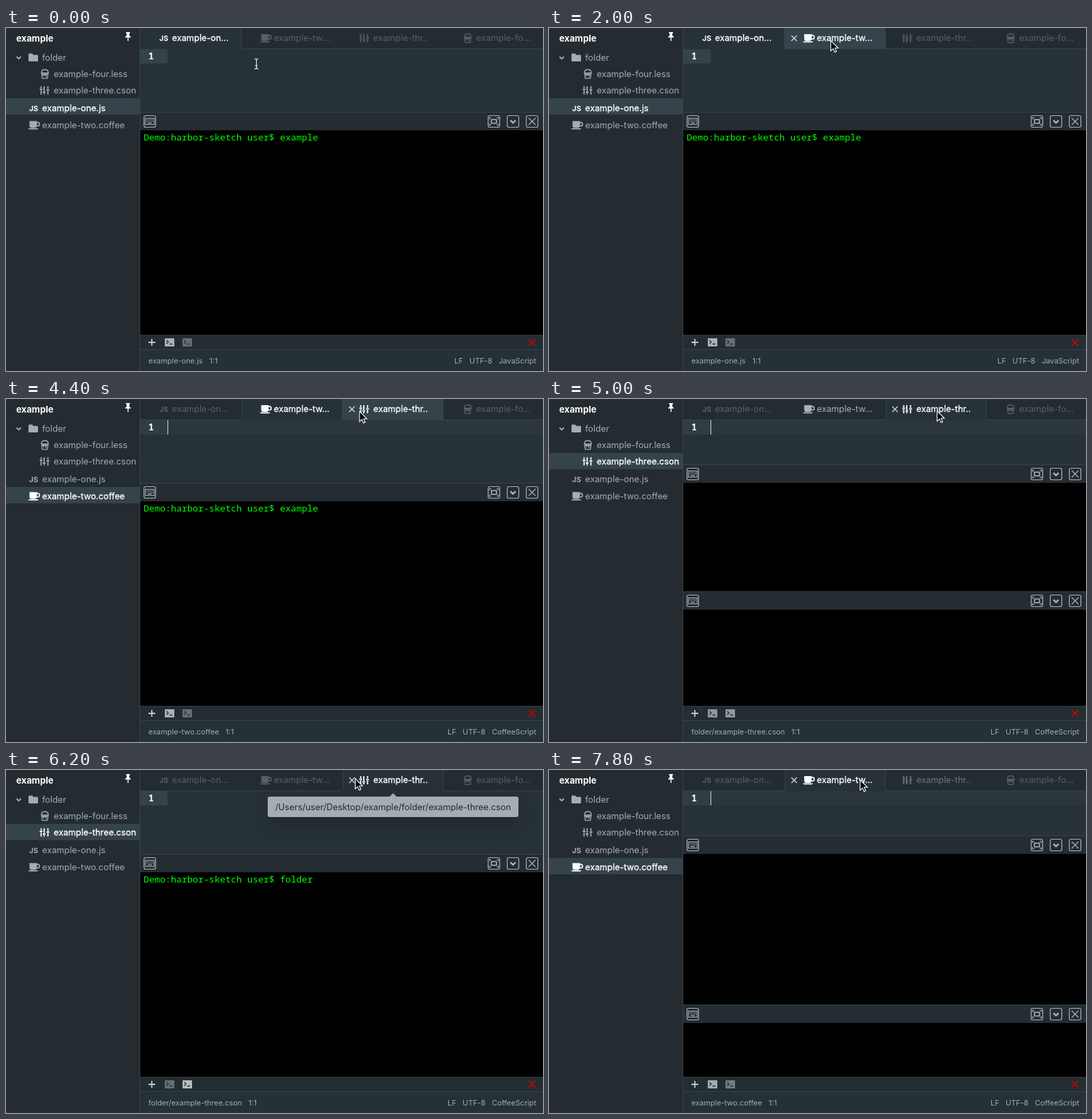
An HTML page that plays this animation: 788 by 503 pixels, repeating every 8 s.

```html
<!DOCTYPE html>
<html lang="en">
<head>
<meta charset="utf-8">
<title>Editor with terminals</title>
<style>
  html, body { margin: 0; width: 100%; height: 100%; overflow: hidden; background: #242c31; }
  svg { display: block; width: 788px; height: 503px; font: 12.8px Inter, sans-serif; }
  text { white-space: pre; }
  .strong { stroke: #fff; stroke-width: .3px; }
  .small { font-size: 10.95px; }
  .mono { font: 500 13.33px "Noto Sans Mono", monospace; }
  .bold { font-weight: 700; }
  .tip { filter: drop-shadow(0 10px 12px rgba(0, 0, 0, .22)); }
</style>
</head>
<body>
<svg id="stage" viewBox="0 0 788 503"></svg>
<script>
const LOOP = 8000, STEP = 200;
const C = { side: '#242c31', bar: '#232c31', edit: '#273238', line: '#35434a', hot: '#35434a',
            text: '#a4adb1', dim: '#566065', icon: '#a9b2b6' };

// row: top of the highlight, base: text baseline in the tree
const FILES = {
  one:   { name: 'example-one.js', lang: 'JavaScript', icon: 'js', short: 'example-on...', row: 103, base: 122 },
  two:   { name: 'example-two.coffee', lang: 'CoffeeScript', icon: 'cup', short: 'example-tw...', row: 129, base: 147 },
  three: { name: 'example-three.cson', dir: 'folder/', lang: 'CoffeeScript', icon: 'sliders', short: 'example-thr..', row: 79, base: 96 },
  four:  { name: 'example-four.less', icon: 'bucket', short: 'example-fo...', base: 72 }
};
const TABS = [
  { id: 'one', x: 197, end: 346, icon: 231, text: 243.5 },
  { id: 'two', x: 346, end: 494, icon: 380.5, text: 393 },
  { id: 'three', x: 494, end: 642, icon: 526, text: 539 },
  { id: 'four', x: 642, end: 788, icon: 677.5, text: 690 }
];

// Pointer path: time, x, y
const PATH = [[0, 367, 52], [1200, 367, 52], [1600, 404, 26], [2000, 413, 18], [2600, 417, 19], [4000, 417, 19],
              [4600, 569, 17], [5800, 569, 17], [6200, 512, 12], [7000, 456, 14], [8000, 456, 14]];

const rect = (x, y, w, h, fill, extra = '') => `<rect x="${x}" y="${y}" width="${w}" height="${h}" fill="${fill}" ${extra}/>`;
const label = (x, y, s, fill, extra = '') => `<text x="${x}" y="${y}" fill="${fill}" ${extra}>${s}</text>`;
const stroke = (d, color, w = 1.3) => `<path d="${d}" fill="none" stroke="${color}" stroke-width="${w}"/>`;
const fill = (d, color) => `<path d="${d}" fill="${color}"/>`;
const at = (x, y, s) => `<g transform="translate(${x} ${y})">${s}</g>`;
const cross = (r, color, w) => stroke(`M${-r} ${-r}L${r} ${r}M${r} ${-r}L${-r} ${r}`, color, w);

// Icons are centred on 0,0
const ICONS = {
  js: c => label(-6, 4, 'JS', c, 'font-size="10.5" font-weight="700"'),
  cup: c => fill('M-6 -6H5V-5H6A3.2 3.2 0 0 1 6 2H4.5Q4 4 2 4H-3Q-6 4 -6 1ZM5 -3.3V.5H6A1.9 1.9 0 0 0 6 -3.3ZM-8 4.6H7Q6.5 6.2 5 6.2H-6Q-7.5 6.2 -8 4.6Z', c),
  sliders: c => stroke('M-5.5 -6V-3M-5.5 0V6M-1 -6V1M-1 4V6M4.5 -6V-2M4.5 1V6', c, 1.8) +
    stroke('M-7.5 -1.5H-3.5M-3 2.5H1M2.5 -.5H6.5', c, 2),
  bucket: c => stroke('M-5 -2Q-5 -6.5 0 -6.5T5 -2M-5.8 -1.7H5.8M-4.8 -1L-3.8 6.3H3.8L4.8 -1', c, 1.3) +
    fill('M-4.5 -1H4.5V1H2.5V4H.8V1.5H-1V3H-2.8V1H-4.5Z', c)
};

function pointerAt(t) {
  const i = PATH.findIndex(p => p[0] > t);
  const [t0, x0, y0] = PATH[i - 1], [t1, x1, y1] = PATH[i];
  const k = (t - t0) / (t1 - t0);
  return { x: x0 + (x1 - x0) * k, y: y0 + (y1 - y0) * k };
}

function stateAt(t) {
  const p = pointerAt(t);
  const focused = t >= 2600 && t < 5200 || t >= 7800;
  return {
    p, focused,
    active: t < 2600 ? 'one' : t < 5000 || t >= 7800 ? 'two' : 'three',
    hover: p.y < 30 ? TABS.find(tab => p.x < tab.end).id : null,
    caret: focused && (t >= 7800 || (t - 2600) % 800 < 400),
    tip: t >= 3000 && t < 4000 ? 'two' : t >= 5600 && t < 6400 ? 'three' : null,
    first: t < 5000 ? 300 : t < 5200 ? 159 : t < 7800 ? 0 : 221,
    fading: t >= 5000 && t < 5200 ? ['two', '#a9b0b3'] : t >= 7800 ? ['three', '#70797d'] : []
  };
}

function sidebar(s) {
  const entry = (id, x, icon) => {
    const f = FILES[id], on = s.active === id, color = on ? '#fff' : C.text;
    return at(icon, f.base - 4.5, ICONS[f.icon](color)) + label(x, f.base, f.name, color, on ? 'class="strong"' : '');
  };
  return rect(0, 0, 196, 503, C.side) + rect(0, FILES[s.active].row, 196, 24, C.hot) +
    label(15, 20, 'example', '#fff', 'font-size="13.2" font-weight="700"') +
    fill('M176 6H182V7.5H181V11L183 13V14H179.8V19H178.4V14H175V13L177 11V7.5H176Z', '#fff') +
    stroke('M15.5 42L18.7 45.2L21.9 42', C.text, 1.8) +
    fill('M33 38.5Q33 37.5 34 37.5H38.5L40 39.5H46Q47 39.5 47 40.5V48Q47 49 46 49H34Q33 49 33 48Z', C.text) +
    label(53, 48, 'folder', C.text) +
    entry('four', 70, 57) + entry('three', 70, 57) + entry('one', 53, 40) + entry('two', 53, 40.5) +
    rect(196, 0, 1, 503, C.line);
}

function tabBar(s) {
  let out = rect(197, 0, 591, 30, C.bar) + rect(197, 30, 591, 1, C.line);
  for (const { id, x, end, icon, text } of TABS) {
    const f = FILES[id], active = s.active === id, hover = s.hover === id, on = active || hover;
    if (active) out += rect(x, 0, end - x, 31, C.edit) + rect(end - 1, 0, 1, 30, C.line) +
      (x > 197 ? rect(x, 0, 1, 30, C.line) : '');
    else if (hover) out += rect(x, 0, end - x, 30, C.hot);
    const color = on ? '#fff' : s.fading[0] === id ? s.fading[1] : C.dim;
    out += at(icon, 15, ICONS[f.icon](color)) + label(text, 19, f.short, color, on ? 'class="strong"' : '');
    if (hover) out += at(x + 13.7, 15, cross(4, '#d5dadc', 1.3));
  }
  return out;
}

function editor(s) {
  return rect(197, 31, 591, 93, C.edit) +
    (s.focused ? rect(237, 31, 551, 21, '#2b373d') : '') +
    rect(197, 31, 40, 21, s.focused ? '#303d44' : '#34434a') +
    label(209, 46, '1', '#fff', 'class="mono bold"') +
    (s.caret ? rect(237, 31, 1, 21, '#d4dadd') : '');
}

function panel(y, h, word) {
  const box = (x, s) => at(x, y + 14, rect(-8.5, -8.5, 17, 17, 'none', `rx="2.5" stroke="${C.icon}" stroke-width="1.2"`) + s);
  const keys = rect(-6.5, -4.5, 13, 9, 'none', `stroke="${C.icon}"`) +
    `<path d="M-5 -2.3H5M-5 0H5" stroke="${C.icon}" stroke-width="1.2" stroke-dasharray="1.2 1"/>` + stroke('M-3 2.4H3', C.icon, 1.2);
  const full = rect(-3.7, -2.7, 7.4, 5.4, 'none', `stroke="${C.icon}" stroke-width="1.6"`) +
    stroke('M-6.5 -3V-5.5H-4M4 -5.5H6.5V-3M6.5 3V5.5H4M-4 5.5H-6.5V3', C.icon, 1.1);
  return rect(197, y, 591, 27, '#242d32') + rect(197, y, 591, 1, C.line) +
    box(211, keys) + box(716, full) + box(744, stroke('M-3.8 -1.7L0 2.1L3.8 -1.7', C.icon, 2.4)) + box(772, cross(5, C.icon, 1.2)) +
    rect(197, y + 27, 591, h, '#000') +
    (word ? label(202, y + 42, 'Demo:harbor-sketch user$ ' + word, '#0f0', 'class="mono"') : '');
}

function panels(s) {
  if (s.first === 300) return panel(123, 300, 'example');
  if (s.first === 0) return panel(123, 300, 'folder');
  return panel(96, s.first, '') + panel(123 + s.first, 300 - s.first, '');
}

function bottom(s) {
  const f = FILES[s.active], path = (f.dir || '') + f.name;
  const mix = { 300: ['#a9b2b6', '#667074'], 159: ['#8f989c', '#8f989c'], 0: ['#667074', '#b4bcbf'], 221: ['#a3acb0', '#727b7f'] }[s.first];
  const term = (x, c) => at(x, 461, rect(-7, -6, 14, 12, c, 'rx="1"') + stroke('M-4.5 -3L-1.8 -.5L-4.5 2M0 2.5H4', '#242d32', 1.3));
  const shift = s.active === 'one' ? 10 : 0;
  return rect(197, 450, 591, 22, '#242d32') + rect(197, 450, 591, 1, '#303c42') +
    stroke('M209 461H219M214 456V466', '#c3cacd', 1.8) + term(240, mix[0]) + term(266, mix[1]) +
    at(772, 461, cross(5, '#d00000', 1.5)) +
    rect(197, 472, 591, 31, '#253037') + rect(197, 471, 591, 1, C.line) +
    `<text class="small" x="209" y="492" fill="${C.text}">${path}<tspan dx="10" fill="#9fb6c4">1:1</tspan></text>` +
    label(648 + shift, 492, 'LF', C.text, 'class="small"') + label(670 + shift, 492, 'UTF-8', C.text, 'class="small"') +
    label(778, 492, f.lang, C.text, 'class="small" text-anchor="end"');
}

function tooltip(id) {
  if (!id) return '';
  const f = FILES[id], wide = id === 'three', x = wide ? 384 : 257, w = wide ? 368 : 327, mid = x + w / 2;
  return `<g class="tip">${rect(x, 39, w, 30, '#a5acb3', 'rx="3"')}${fill(`M${mid - 5} 39L${mid} 34L${mid + 5} 39Z`, '#a5acb3')}</g>` +
    label(mid, 59, `/Users/user/Desktop/example/${f.dir || ''}${f.name}`, '#232a2f', 'text-anchor="middle"');
}

function pointer({ x, y }) {
  if (y > 30) return at(x + .5, y, stroke('M-3 -7Q0 -7 0 -5V6Q0 8 -3 8M3 -7Q0 -7 0 -5M0 6Q0 8 3 8M-2 3H2', '#e6e9ea', 1.2));
  return at(x + .5, y + .5, '<path d="M0 0V15L3.5 11.8L5.8 17L8.2 16L6 10.8H10.7Z" fill="#000" stroke="#fff" stroke-width="1.1"/>');
}

const stage = document.getElementById('stage');
let shown = -1;
function frame() {
  const step = Math.floor(performance.now() % LOOP / STEP);
  if (step !== shown) {
    shown = step;
    const s = stateAt(step * STEP);
    stage.innerHTML = sidebar(s) + tabBar(s) + editor(s) + panels(s) + bottom(s) + tooltip(s.tip) + pointer(s.p);
  }
  requestAnimationFrame(frame);
}
frame();
</script>
</body>
</html>
```
